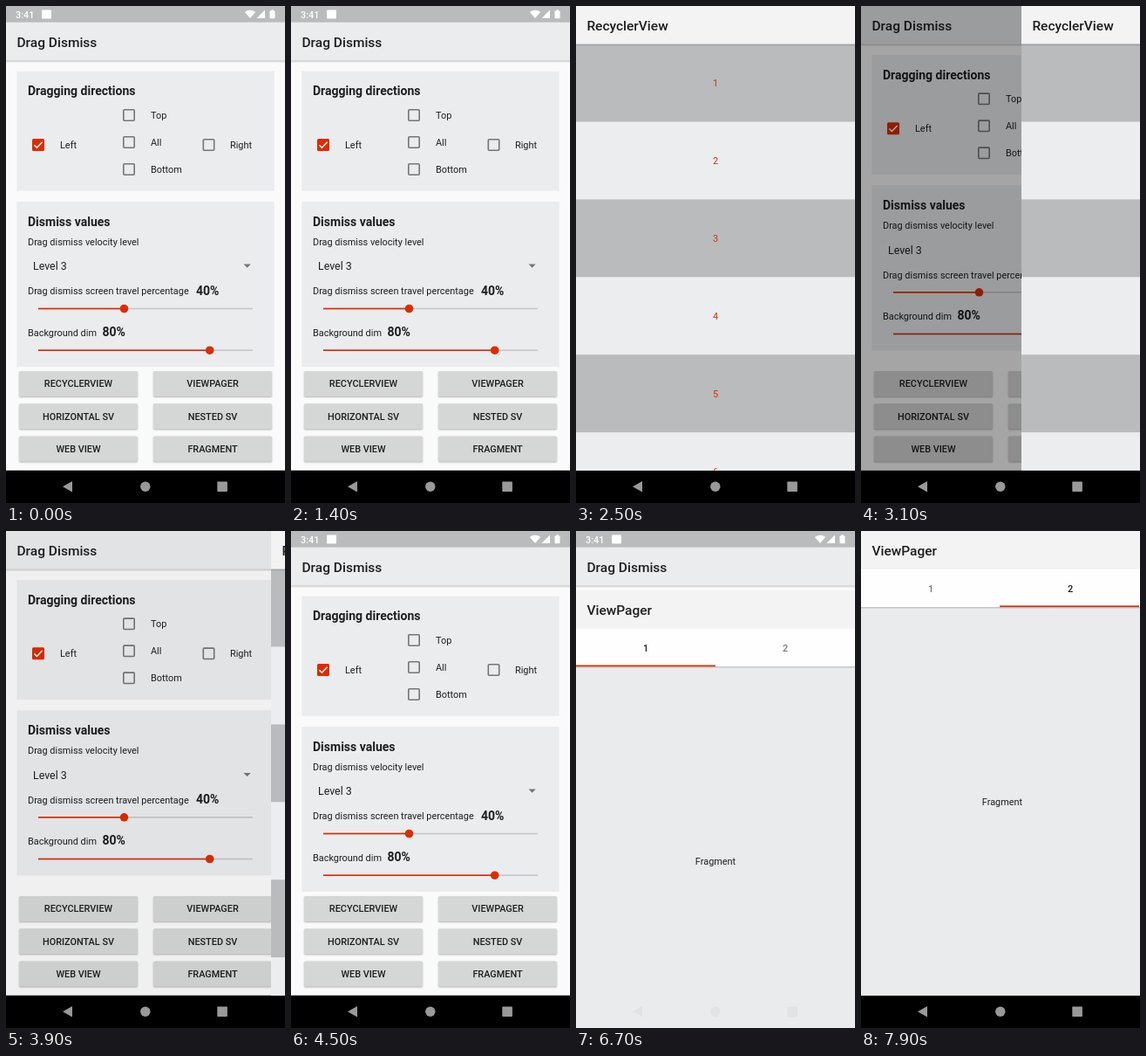
These frames come from a looping animation (320 by 569 pixels, 8000 ms). An HTML page with a canvas:

```html
<!DOCTYPE html>
<html lang="en">
<head>
<meta charset="utf-8">
<title>Drag Dismiss</title>
<style>
  html, body { margin: 0; width: 100%; height: 100%; overflow: hidden; background: #000; }
  canvas { display: block; width: 320px; height: 569px; }
</style>
</head>
<body>
<canvas id="stage"></canvas>
<script>
const W = 320, H = 569, LOOP = 8000, STEP = 100;
const STATUS_H = 18.7, BAR_H = 43.6, NAV_Y = 531.7, ROW_H = 88.9;
const RED = '#dd2c00', INK = '#1d1e1f', PANEL = '#eaecee', GREY = '#b9bbbc', PAPER = '#fafafa';

const canvas = document.getElementById('stage');
const ctx = canvas.getContext('2d');
const ratio = window.devicePixelRatio || 1;
canvas.width = W * ratio;
canvas.height = H * ratio;

function rect(x, y, w, h, color) {
  ctx.fillStyle = color;
  ctx.fillRect(x, y, w, h);
}

function roundRect(x, y, w, h, r, color) {
  ctx.fillStyle = color;
  ctx.beginPath();
  ctx.roundRect(x, y, w, h, r);
  ctx.fill();
}

function circle(x, y, r, color) {
  ctx.fillStyle = color;
  ctx.beginPath();
  ctx.arc(x, y, r, 0, Math.PI * 2);
  ctx.fill();
}

function polygon(points, color) {
  ctx.fillStyle = color;
  ctx.beginPath();
  points.forEach(([x, y]) => ctx.lineTo(x, y));
  ctx.closePath();
  ctx.fill();
}

// y is the middle of the capital letters
function text(label, x, y, size = 10.9, weight = 400, color = INK, align = 'left') {
  ctx.font = `${weight} ${size}px Roboto, sans-serif`;
  ctx.textAlign = align;
  ctx.fillStyle = color;
  ctx.fillText(label, x, y + size * 0.355);
}

function shadowBelow(y, height = 3) {
  const g = ctx.createLinearGradient(0, y, 0, y + height);
  g.addColorStop(0, 'rgba(0,0,0,0.2)');
  g.addColorStop(1, 'rgba(0,0,0,0)');
  rect(0, y, W, height, g);
}

// Linear interpolation through [time, value] points
function track(t, points) {
  if (t <= points[0][0]) return points[0][1];
  for (let i = 1; i < points.length; i++) {
    const [t0, v0] = points[i - 1], [t1, v1] = points[i];
    if (t <= t1) return v0 + (v1 - v0) * (t - t0) / (t1 - t0);
  }
  return points[points.length - 1][1];
}

function checkbox(x, y, label, labelX, checked) {
  if (checked) {
    roundRect(x - 7, y - 7, 14, 14, 1.5, RED);
    ctx.strokeStyle = '#fff';
    ctx.lineWidth = 1.5;
    ctx.beginPath();
    ctx.moveTo(x - 4.6, y + 0.2);
    ctx.lineTo(x - 1.6, y + 3.2);
    ctx.lineTo(x + 4.6, y - 3.2);
    ctx.stroke();
  } else {
    ctx.strokeStyle = '#737576';
    ctx.lineWidth = 1.6;
    ctx.beginPath();
    ctx.roundRect(x - 6.2, y - 6.2, 12.4, 12.4, 1);
    ctx.stroke();
  }
  text(label, labelX, y + 0.3);
}

function slider(y, thumbX) {
  rect(37, y - 0.8, 246, 1.6, '#c4c6c8');
  rect(37, y - 0.8, thumbX - 37, 1.6, RED);
  circle(thumbX, y, 4.8, RED);
}

function button(label, x, y, ripple) {
  ctx.save();
  ctx.shadowColor = 'rgba(0,0,0,0.28)';
  ctx.shadowBlur = 2 * ratio;
  ctx.shadowOffsetY = ratio;
  roundRect(x, y, 136, 29, 1.6, '#d5d6d6');
  ctx.restore();
  if (ripple > 0) roundRect(x, y, 136, 29, 1.6, `rgba(0,0,0,${0.2 * ripple})`);
  text(label, x + 68, y + 14.6, 10.9, 500, INK, 'center');
}

function statusBar(alpha) {
  rect(0, 0, W, STATUS_H, GREY);
  ctx.globalAlpha = alpha;
  text('3:41', 11, 9.7, 10.9, 500, '#fff');
  roundRect(41, 4.5, 11, 10, 1, '#fff');
  ctx.fillStyle = '#fff';
  ctx.beginPath();
  ctx.moveTo(280, 14);
  ctx.arc(280, 14, 9.3, -Math.PI * 0.73, -Math.PI * 0.27);
  ctx.fill();
  polygon([[287.5, 14], [297, 14], [297, 4.5]], '#fff');
  roundRect(302.5, 5.5, 6, 8.7, 0.7, '#fff');
  rect(304.2, 4.4, 2.6, 1.5, '#fff');
  ctx.globalAlpha = 1;
}

function navIcons(color) {
  polygon([[65, 550.2], [76, 544], [76, 556.4]], color);
  circle(159.8, 550.2, 5.7, color);
  roundRect(242.3, 544.4, 11.6, 11.6, 0.8, color);
}

function toolbar(title, y, color) {
  rect(0, y, W, BAR_H, color);
  text(title, 12.4, y + 22.3, 15.5, 500, INK);
}

function settings(shift, ripples) {
  rect(0, 0, W, NAV_Y, PAPER);
  ctx.save();
  ctx.translate(0, -shift);
  toolbar('Drag Dismiss', STATUS_H, PANEL);
  shadowBelow(STATUS_H + BAR_H);

  rect(12.4, 74.7, 295.2, 137, PANEL);
  text('Dragging directions', 25, 97.5, 14, 700);
  checkbox(141, 125, 'Top', 166);
  checkbox(141, 156, 'All', 166);
  checkbox(141, 187, 'Bottom', 166);
  checkbox(37, 159, 'Left', 62, true);
  checkbox(232.5, 159, 'Right', 257);

  rect(12.4, 224, 295.2, 189, PANEL);
  text('Dismiss values', 25, 247, 14, 700);
  text('Drag dismiss velocity level', 25, 269.7);
  text('Level 3', 31, 298, 12.4);
  polygon([[272.5, 295.6], [280.7, 295.6], [276.6, 299.7]], '#737576');
  text('Drag dismiss screen travel percentage', 25, 326.5);
  text('40%', 218, 325.6, 14, 700);
  slider(346.5, 135.5);
  text('Background dim', 25, 374.2);
  text('80%', 110.5, 373.2, 14, 700);
  slider(394.2, 233.7);
  ctx.restore();

  const labels = ['RECYCLERVIEW', 'VIEWPAGER', 'HORIZONTAL SV', 'NESTED SV', 'WEB VIEW', 'FRAGMENT'];
  labels.forEach((label, i) =>
    button(label, i % 2 ? 169 : 15, 418 + Math.floor(i / 2) * 37.3, ripples[i] || 0));
}

function listScreen() {
  for (let i = 0; i < 6; i++) {
    const y = BAR_H + i * ROW_H;
    rect(0, y, W, ROW_H + 1, i % 2 ? '#ebedee' : GREY);
    text(String(i + 1), W / 2, y + 44.8, 10.9, 400, RED, 'center');
  }
  toolbar('RecyclerView', 0, '#f3f3f3');
  shadowBelow(BAR_H, 2.5);
}

function pagerScreen(t) {
  const page = track(t, [[7300, 0], [7400, 0.05], [7500, 0.24], [7600, 0.53],
    [7700, 0.82], [7800, 0.955], [7900, 0.994]]);
  const second = t >= 7700;
  rect(0, 0, W, H, '#eaebed');
  toolbar('ViewPager', 0, '#f3f3f3');
  rect(0, BAR_H, W, 43.4, '#fefefe');
  shadowBelow(87, 2.5);
  text('1', 80, 66.2, 10.9, 500, second ? '#77787a' : INK, 'center');
  text('2', 240, 66.2, 10.9, 500, second ? INK : '#77787a', 'center');
  rect(page * 160, 85.4, 160, 1.7, RED);
  for (const i of [0, 1]) text('Fragment', W / 2 + (i - page) * W, 310, 10.9, 400, INK, 'center');
}

function sheet(x, y, bottom, paint) {
  ctx.save();
  ctx.beginPath();
  ctx.rect(x, y, W, bottom - y);
  ctx.clip();
  ctx.translate(x, y);
  paint();
  ctx.restore();
}

function slideUp(t, start) {
  const p = Math.min(1, Math.max(0, (t - start) / 289));
  return H * (1 - p) ** 2;
}

function draw(t) {
  const dragging = t >= 1900 && t < 4300;
  const inPager = t >= 6500;
  const ripples = [
    track(t, [[1100, 0], [1200, 0.6], [1300, 1], [1400, 0]]),
    track(t, [[5800, 0], [5900, 0.6], [6000, 1], [6100, 0]])
  ];
  const statusAlpha = t < 4300 ? 1 : track(t, [[4200, 0], [4500, 1]]);

  ctx.setTransform(ratio, 0, 0, ratio, 0, 0);
  rect(0, 0, W, H, '#000');
  settings(dragging ? STATUS_H : 0, ripples);
  if (!dragging) statusBar(statusAlpha);

  let iconColor = '#999';
  if (t >= 1600 && t < 4200) {
    const rise = slideUp(t, 1611);
    const x = track(t, [[2500, 0], [2600, 9], [2700, 32], [2800, 64], [2900, 102], [3000, 144],
      [3100, 184], [3200, 215], [3300, 238], [3500, 266], [3700, 286], [3900, 304], [4100, 320]]);
    if (x > 0) rect(0, 0, W, NAV_Y, `rgba(0,0,0,${0.8 * (1 - x / W)})`);
    sheet(x, rise, rise > 0.5 ? H : NAV_Y, listScreen);
    if (rise > 0.5 && rise < 100) iconColor = '#e2e3e4';
  } else if (inPager) {
    const rise = slideUp(t, 6511);
    sheet(0, rise, rise > 0.5 ? H : NAV_Y, () => pagerScreen(t));
    if (rise > 0.5 && rise < 100) iconColor = '#e2e3e4';
  }
  navIcons(iconColor);
}

const began = performance.now();
function tick() {
  const t = (performance.now() - began) % LOOP;
  draw(Math.floor(t / STEP) * STEP);
  requestAnimationFrame(tick);
}
tick();
</script>
</body>
</html>
```
